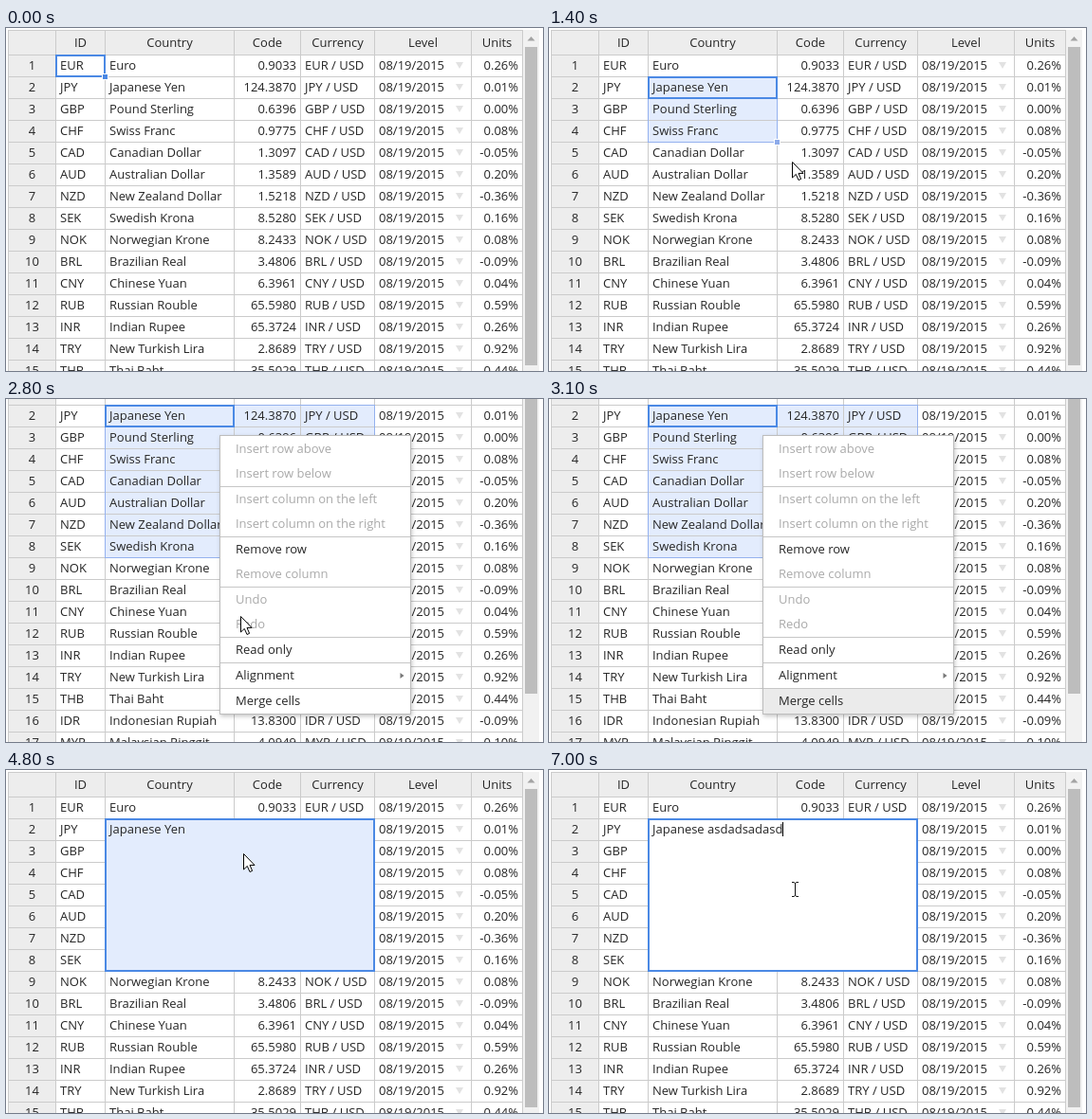
An HTML page that plays this animation: 566x362 px, repeating every 7100 ms.

```html
<!DOCTYPE html>
<html lang="en">
<head>
<meta charset="utf-8">
<title>Merge cells</title>
<style>
  html, body { margin: 0; width: 100%; height: 100%; overflow: hidden; background: #fff; }
  svg { display: block; }
  text { font: 13px "Open Sans", sans-serif; fill: #262626; white-space: pre; }
  .mid { text-anchor: middle; }
  .end { text-anchor: end; }
  .off { fill: #a9a9a9; }
  #menu { filter: drop-shadow(1px 2px 2px rgba(0, 0, 0, .22)); }
  #menu text { filter: none; }
</style>
</head>
<body>
<svg width="566" height="362" viewBox="0 0 566 362">
  <g id="page">
    <g id="back"></g>
    <rect id="tint" fill="#e3ecfd"/>
    <g id="lines" fill="#cbcbcb"></g>
    <g id="cells"></g>
    <g id="merged">
      <rect id="fill" x="105" y="52" width="283" height="160"/>
      <text id="entry" x="109" y="67"></text>
      <rect id="caret" y="55" width="1" height="15" fill="#000"/>
    </g>
    <rect id="area" fill="none" stroke="#94b1ee"/>
    <rect id="active" fill="none" stroke="#4b89e4" stroke-width="2"/>
    <rect id="grip" width="6" height="6" stroke="#fff"/>
    <g id="menu"></g>
  </g>
  <g id="arrow">
    <path d="M.5.5V17L4.3 13.4 7 19.5 9.6 18.4 7 12.4H12Z" fill="#fff" stroke="#000"/>
    <g id="busy">
      <circle cx="13" cy="0" r="8.5" fill="#17456f"/>
      <circle cx="13" cy="0" r="7" fill="#36a0dc"/>
      <circle cx="13" cy="0" r="3.5" fill="#fff" stroke="#17456f" stroke-width="1.5"/>
    </g>
  </g>
  <path id="beam" fill="none" stroke="#111" d="M-3-7.5H-1L.5-6.5 2-7.5H4M.5-6.5V6.5M-3 7.5H-1L.5 6.5 2 7.5H4"/>
</svg>
<script>
const STEP = 100, STEPS = 71, SCROLL = 45;
const X = [2, 52, 104, 240, 310, 388, 490, 544];
const rowY = r => 28 + 23 * (r - 1);

const heads = ['ID', 'Country', 'Code', 'Currency', 'Level', 'Units'];
const rows = `EUR,Euro,0.9033,0.26
JPY,Japanese Yen,124.3870,0.01
GBP,Pound Sterling,0.6396,0.00
CHF,Swiss Franc,0.9775,0.08
CAD,Canadian Dollar,1.3097,-0.05
AUD,Australian Dollar,1.3589,0.20
NZD,New Zealand Dollar,1.5218,-0.36
SEK,Swedish Krona,8.5280,0.16
NOK,Norwegian Krone,8.2433,0.08
BRL,Brazilian Real,3.4806,-0.09
CNY,Chinese Yuan,6.3961,0.04
RUB,Russian Rouble,65.5980,0.59
INR,Indian Rupee,65.3724,0.26
TRY,New Turkish Lira,2.8689,0.92
THB,Thai Baht,35.5029,0.44
IDR,Indonesian Rupiah,13.8300,-0.09
MYR,Malaysian Ringgit,4.0949,0.10`.split('\n').map(r => r.split(','));

// "-" marks a disabled item, "_" a rule below it
const items = ['-Insert row above', '-Insert row below_', '-Insert column on the left',
  '-Insert column on the right_', 'Remove row', '-Remove column_', '-Undo', '-Redo_',
  'Read only_', 'Alignment_', 'Merge cells'];

const $ = id => document.getElementById(id);
const set = (el, attrs) => { for (const a in attrs) el.setAttribute(a, attrs[a]); return el; };
const show = (id, on) => { $(id).style.display = on ? '' : 'none'; };
const add = (parent, tag, attrs) =>
  $(parent).appendChild(set(document.createElementNS('http://www.w3.org/2000/svg', tag), attrs));
const box = (parent, x, y, width, height, more) => add(parent, 'rect', { x, y, width, height, ...more });
const label = (parent, x, y, str, cls = '') => {
  add(parent, 'text', { x, y, class: cls }).textContent = str;
};

function buildTable() {
  const bottom = rowY(rows.length + 1);
  box('back', 2, 2, 543, 26, { fill: '#ededed' });
  box('back', 2, 28, 50, bottom - 28, { fill: '#ededed' });
  box('back', 545, 2, 17, bottom, { fill: '#f1f1f1' });
  box('back', 547, 20, 13, 336, { fill: '#bdbdbd' });
  add('back', 'path', { d: 'M549.5 13.5H557.5L553.5 9Z', fill: '#a3a3a3' });

  X.forEach(x => box('lines', x, 2, 1, bottom));
  box('lines', 2, 2, 543, 1);
  heads.forEach((h, i) => label('cells', (X[i + 1] + X[i + 2] + 1) / 2, 20, h, 'mid'));
  rows.forEach(([id, name, code, units], i) => {
    const top = rowY(i + 1), y = top + 16;
    box('lines', 2, top, 543, 1);
    label('cells', 27.5, y, i + 1, 'mid');
    label('cells', 57, y, id);
    label('cells', 109, y, name);
    label('cells', 306, y, code, 'end');
    label('cells', 315, y, id + ' / USD');
    label('cells', 393, y, '08/19/2015');
    add('cells', 'path', { d: `M474 ${top + 8}h8l-4 7z`, fill: '#e2e2e2' });
    label('cells', 540, y, units + '%', 'end');
  });
}

const slots = [];
function buildMenu() {
  box('menu', 225.5, 83.5, 201, 294, { fill: '#fff', stroke: '#bdbdbd' });
  let y = 85;
  for (const item of items) {
    const off = item[0] === '-', rule = item.endsWith('_');
    slots.push({ y, off, bg: box('menu', 226, y, 200, 26, { fill: '#ebebeb' }) });
    label('menu', 242, y + 17, item.replace(/^-|_$/g, ''), off ? 'off' : '');
    if (item.startsWith('Align')) add('menu', 'path', { d: `M415.5 ${y + 10}v6l4-3z`, fill: '#777' });
    y += 26;
    if (rule) box('menu', 226, y++, 200, 1, { fill: '#c6c6c6' });
  }
}

// Pointer path: step, x, y
const path = [[1, 410, 345], [8, 170, 64], [9, 170, 64], [14, 256, 141], [16, 372, 206],
  [18, 372, 206], [22, 225, 92], [25, 225, 92], [30, 262, 320], [40, 275, 322],
  [48, 250, 88], [51, 235, 98], [57, 235, 98], [64, 259, 126], [71, 259, 126]];

function pointer(k) {
  const i = Math.max(1, path.findIndex(p => p[0] >= k));
  const [a, b] = [path[i - 1], path[i]];
  const u = Math.max(0, (k - a[0]) / (b[0] - a[0]));
  return [a[1] + (b[1] - a[1]) * u, a[2] + (b[2] - a[2]) * u];
}

// Selected cells as column and row spans
function selection(k) {
  if (k < 8) return { c0: 1, r0: 1, c1: 1, r1: 1 };
  if (k >= 36) return { c0: 2, r0: 2, c1: 4, r1: 8 };
  const [x, y] = pointer(Math.min(16, Math.max(9, k - 2)));
  return { c0: 2, r0: 2, c1: x < X[3] ? 2 : x < X[4] ? 3 : 4, r1: Math.floor((y - 28) / 23) + 1 };
}

function entryText(k) {
  if (k < 61) return 'Japanese Yen'.slice(0, 12 - Math.min(3, Math.max(0, k - 57)));
  return 'Japanese ' + 'asdadsadasd'.slice(0, Math.round((k - 60) * 1.1));
}

function frame(el, l, t, r, b, w) {
  set(el, { x: l + w / 2, y: t + w / 2, width: r - l + 1 - w, height: b - t + 1 - w });
}

function draw(k) {
  const merged = k >= 36, single = k >= 51, editing = k >= 57;
  const scroll = k >= 28 && k < 43 ? SCROLL : 0;
  const [px, py] = pointer(k).map(Math.round);
  set($('page'), { transform: `translate(0 ${-scroll})` });

  const { c0, r0, c1, r1 } = selection(k);
  const l = X[c0], t = rowY(r0), r = X[c1 + 1], b = rowY(r1 + 1);
  const range = !merged && (c0 !== c1 || r0 !== r1);
  show('tint', range);
  show('area', range);
  set($('tint'), { x: l, y: t, width: r - l, height: b - t });
  frame($('area'), l, t, r, b, 1);
  if (range) frame($('active'), l, t, X[c0 + 1], rowY(r0 + 1), 2);
  else frame($('active'), l, t, r, b, 2);
  show('grip', merged ? single && !editing : true);
  set($('grip'), { x: r - 2.5, y: b - 2.5, fill: range ? '#8caaea' : '#4b89e4' });

  show('merged', merged);
  show('caret', editing);
  set($('fill'), { fill: single ? '#fff' : '#e3ecfd' });
  $('entry').textContent = entryText(k);
  if (editing) set($('caret'), { x: Math.round(109 + $('entry').getComputedTextLength()) });

  show('menu', k >= 25 && !merged);
  const my = py + scroll;
  slots.forEach(s => {
    s.bg.style.display = !s.off && my >= s.y && my < s.y + 26 ? '' : 'none';
  });

  const beam = k >= 50;
  show('arrow', k > 0 && !beam && (k < 30 || k > 33));
  show('busy', k >= 22 && k < 25);
  show('beam', beam);
  set($(beam ? 'beam' : 'arrow'), { transform: `translate(${px} ${py})` });
}

buildTable();
buildMenu();
const start = performance.now();
let last = -1;
function tick(now) {
  const k = Math.floor(Math.max(0, now - start) / STEP) % STEPS;
  if (k !== last) draw(last = k);
  requestAnimationFrame(tick);
}
tick(start);
</script>
</body>
</html>
```
